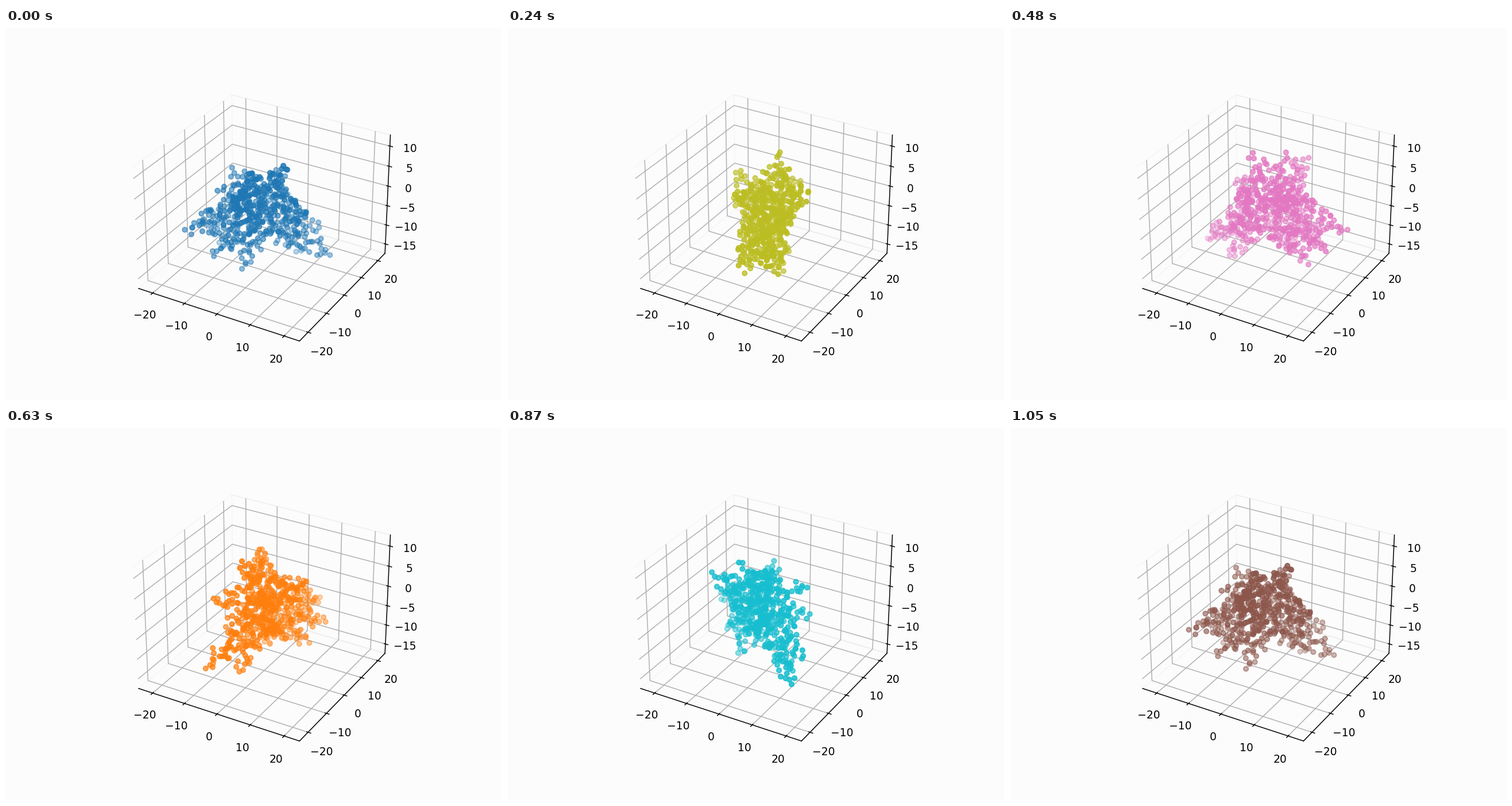
Write a matplotlib script that moves like this. It is 864 by 648 pixels and loops after 1.08 s.

```python
import itertools

import matplotlib.pyplot as plt
import numpy as np
from matplotlib.animation import FuncAnimation

W, H, DPI = 864, 648, 135
FRAMES, INTERVAL = 36, 30
BACKGROUND = "#fcfcfc"

ATOMS = 520
BOND = 1.3, 1.6
CORE, CORE_RADIUS, TIP_RADIUS = np.array([0, -0.8, -0.8]), 7.0, 1.2
TIPS = np.array([
    (0.5, -7.1, 10), (5.8, -0.1, 10.4), (-0.9, -14.3, 6.9),     # crown
    (-10.9, 1.8, 5.5), (0.7, 10.8, 4.2), (-11.2, -5.3, 2.5),
    (13.3, -1.4, 1), (0.7, 11.6, -2.4),                         # waist
    (-16.8, -13, -5.5), (-17.2, -4.3, -7.8), (11.3, 10, -7.8),
    (16.3, 7.1, -12.4), (-9.1, -11, -11.2), (-12.6, -2.6, -12.2),
    (7.4, 7.3, -13.6), (-2.4, -7.7, -14.2),                     # legs
])


def in_body(points):
    """True where a point lies in one of the cones from core to tip."""
    inside = np.zeros(len(points), bool)
    for arm in TIPS - CORE:
        rel = points - CORE
        s = np.clip(rel @ arm / (arm @ arm), 0, 1)
        off = np.linalg.norm(rel - s[:, None] * arm, axis=1)
        inside |= off < CORE_RADIUS + (TIP_RADIUS - CORE_RADIUS) * s
    return inside


def build_molecule():
    """Lay a loose chain along each arm, then grow bonded atoms to fill in."""
    rng = np.random.default_rng(7)
    cloud = rng.uniform((-19, -17, -15.5), (19, 17, 10.9), (250_000, 3))
    cloud = cloud[in_body(cloud)]

    steps = np.linspace(1, 0.55, 7)[:, None, None]
    chains = (CORE + steps * (TIPS - CORE)).reshape(-1, 3)
    chains[len(TIPS):] += rng.normal(0, 0.4, chains[len(TIPS):].shape)

    atoms = np.empty((ATOMS, 3))
    atoms[0] = TIPS[0]
    n = 1
    for p in itertools.chain(chains, cloud[:60]):
        if np.linalg.norm(atoms[:n] - p, axis=1).min() > BOND[0]:
            atoms[n] = p
            n += 1
    for p in itertools.chain(cloud, cloud, cloud):
        if n == ATOMS:
            break
        gap = np.linalg.norm(atoms[:n] - p, axis=1)
        if BOND[0] < gap.min() < BOND[1] and (gap < 2.3).sum() <= 2:
            atoms[n] = p
            n += 1
    return atoms[:n]


def turn(points, step):
    """Rotate points about the z axis; the last step closes the circle."""
    a = 2 * np.pi * step / (FRAMES - 1)
    c, s = np.cos(a), np.sin(a)
    return points @ np.array([[c, s, 0], [-s, c, 0], [0, 0, 1]])


fig = plt.figure(figsize=(W / DPI, H / DPI), dpi=DPI, facecolor=BACKGROUND)
ax = fig.add_subplot(projection="3d", facecolor=BACKGROUND)
ax.set_xlim(-24.5, 24.46)
ax.set_ylim(-24.5, 24.46)
ax.set_zlim(-17.47, 12.72)
for axis in (ax.xaxis, ax.yaxis, ax.zaxis):
    axis.pane.fill = False

molecule = build_molecule()
drawn = []


def update(step):
    while drawn:
        drawn.pop().remove()
    drawn.append(ax.scatter(*turn(molecule, step).T, color=f"C{step % 10}"))
    return drawn


anim = FuncAnimation(fig, update, frames=FRAMES, interval=INTERVAL,
                     init_func=lambda: update(0), repeat=True, repeat_delay=0)
plt.show()
```
